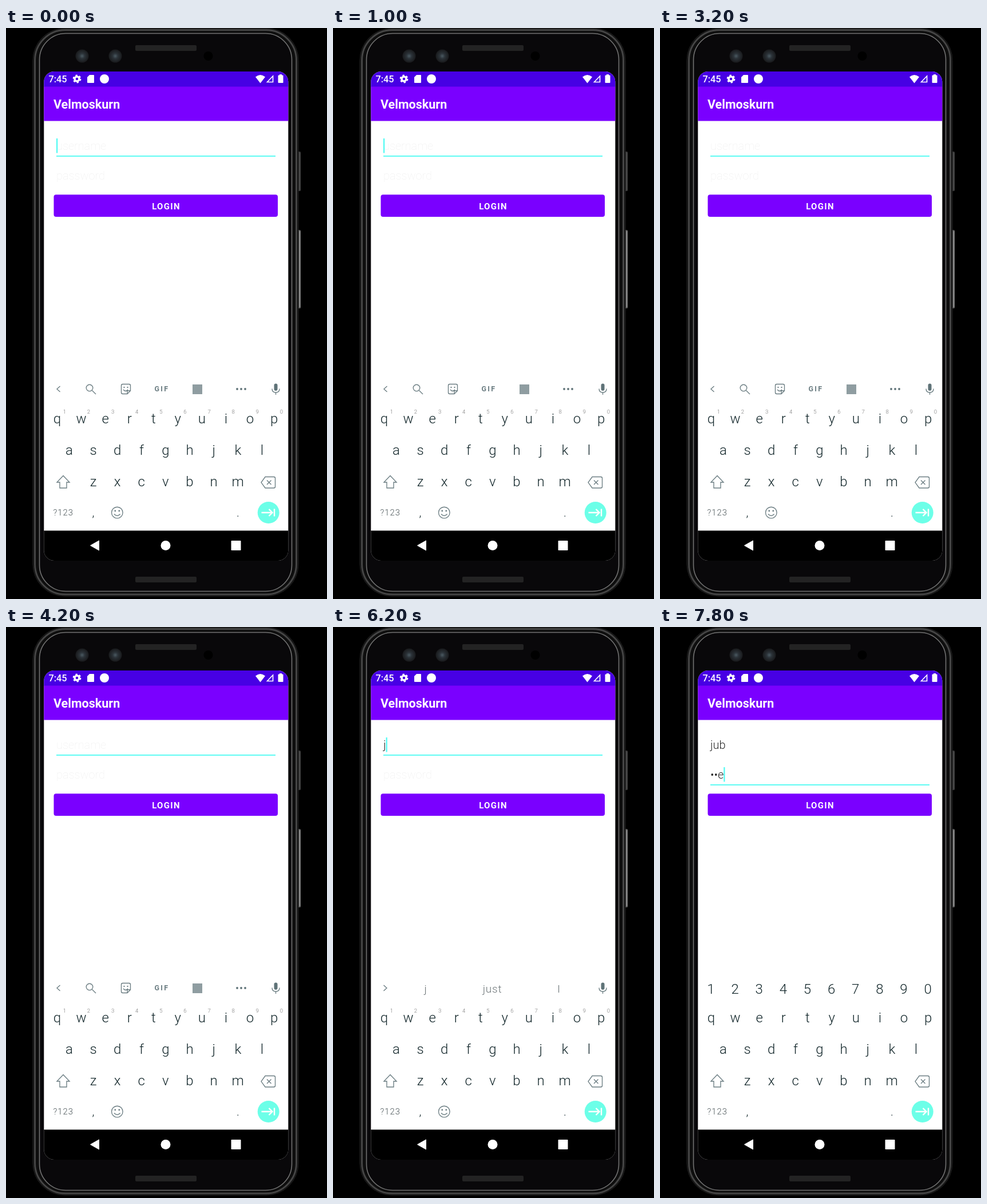
Recreate the animation shown at these times as an HTML page. Size 561 by 998 pixels, loop 8000 ms.

```html
<!DOCTYPE html>
<html lang="en">
<head>
<meta charset="utf-8">
<title>Login screen</title>
<style>
  html, body { margin: 0; width: 100%; height: 100%; overflow: hidden; background: #000; }
  svg { display: block; width: 100%; height: 100%; }
  text { font-family: Roboto, "Noto Sans", sans-serif; }
  .mid { text-anchor: middle; }
  .key { font-size: 24px; font-weight: 300; fill: #14282c; text-anchor: middle; }
  .tip { font-size: 9.5px; font-weight: 300; fill: #777; text-anchor: middle; }
  .word { font-size: 19px; font-weight: 300; fill: #6c7477; text-anchor: middle; letter-spacing: .8px; }
  .field { font-size: 20px; font-weight: 300; fill: #2c2c2c; }
  .hint { font-size: 20px; font-weight: 100; fill: #efefef; }
  .line { fill: none; stroke: #6b7d82; stroke-width: 1.35; }
</style>
</head>
<body>
<svg viewBox="0 0 561 998">
  <defs>
    <radialGradient id="lens">
      <stop offset="0" stop-color="#4b5a62"/>
      <stop offset=".4" stop-color="#2b3238"/>
      <stop offset="1" stop-color="#191a1c"/>
    </radialGradient>
    <clipPath id="glass"><rect x="66.300" y="76" width="427" height="855" rx="18"/></clipPath>
  </defs>

  <rect width="561" height="998"/>

  <!-- phone body -->
  <g id="phone">
    <rect x="510" y="216" width="5" height="69" rx="1.500" fill="#3b3b3b"/>
    <rect x="510" y="353" width="5" height="137" rx="1.500" fill="#5c5c5c"/>
    <path d="M513.500 218v65" stroke="#555" fill="none"/>
    <path d="M513.500 355v133" stroke="#a0a0a0" stroke-width="1.500" fill="none"/>
    <rect x="47" y="0.500" width="464" height="992.500" rx="56" fill="#0e0e0e" stroke="#242424"/>
    <rect x="50.500" y="3.500" width="457" height="986.500" rx="53" fill="none" stroke="#454545" stroke-width="3"/>
    <rect x="58.500" y="9.500" width="441" height="975" rx="46" fill="#09080a" stroke="#727272" stroke-width="1.600"/>
    <rect x="226" y="30" width="107" height="10" rx="2" fill="#232323"/>
    <rect x="226" y="959" width="107" height="10" rx="2" fill="#232323"/>
    <circle cx="133" cy="49" r="11.500" fill="url(#lens)"/>
    <circle cx="191" cy="49" r="11.500" fill="url(#lens)"/>
    <circle cx="353.500" cy="49" r="8"/>
  </g>

  <g clip-path="url(#glass)">
    <rect x="66" y="76" width="428" height="855" fill="#fff"/>
    <rect x="66" y="76" width="428" height="27" fill="#4700e4"/>
    <rect x="66" y="102.500" width="428" height="60" fill="#7a00ff"/>
    <rect x="66" y="878.500" width="428" height="53"/>
  </g>

  <!-- status bar and title -->
  <g fill="#fff">
    <text x="74.500" y="95" font-size="16.300" font-weight="500">7:45</text>
    <circle cx="124" cy="89" r="4" fill="none" stroke="#fff" stroke-width="3.500"/>
    <circle cx="124" cy="89" r="6.200" fill="none" stroke="#fff" stroke-width="2.400" stroke-dasharray="3.200 3.290"/>
    <path d="M146 82h7q1 0 1 1v12q0 1-1 1h-10q-1 0-1-1V86z"/>
    <circle cx="172" cy="89" r="8"/>
    <path d="M436 85.500q8.500-7 17 0L444.500 96.500z"/>
    <path d="M456.500 94.500L466.500 84v10.500z" fill="none" stroke="#fff" stroke-width="1.700"/>
    <path d="M478 82.500v-1.500h4v1.500h1.500q1 0 1 1V95q0 1-1 1h-7q-1 0-1-1V83.500q0-1 1-1z"/>
    <text x="83" y="141" font-size="21.500" font-weight="700">Velmoskurn</text>
  </g>

  <!-- form -->
  <rect x="83.500" y="291.300" width="391.500" height="38.700" rx="4" fill="#7a00ff"/>
  <text class="mid" x="280" y="316.700" font-size="15" font-weight="700" letter-spacing="1.300" fill="#fff">LOGIN</text>
  <text id="nameHint" class="hint" x="88" y="213">username</text>
  <text id="passHint" class="hint" x="88" y="265">password</text>
  <text id="name" class="field" x="88" y="213"></text>
  <text id="pass" class="field" x="88" y="265"></text>
  <rect id="under" x="88" width="383" height="1.800" fill="#4ffbf3"/>
  <rect id="caret" width="2.200" height="25.500" fill="#4ffbf3"/>

  <!-- strip above the keys -->
  <g id="tools">
    <path class="line" d="M94.500 626l-5.500 5 5.500 5M150.500 633.500l6.500 6.500"/>
    <circle class="line" cx="146" cy="629" r="5.800"/>
    <path class="line" d="M204 622.500h11q2.500 0 2.500 2.500v9l-5.500 5.500h-8q-2.500 0-2.500-2.500v-12q0-2.500 2.500-2.500zM217.500 634h-5.500v5.500M205 632q4 5 8 0"/>
    <path d="M205.500 627h2v2h-2zM211.500 627h2v2h-2z" fill="#6b7d82"/>
    <text class="mid" x="272.500" y="635.300" font-size="12.500" font-weight="700" letter-spacing="2.300" fill="#6b7d82">GIF</text>
    <rect x="326" y="623" width="17" height="17" fill="#8f9da1"/>
    <g fill="#5f7378">
      <circle cx="404" cy="631" r="1.900"/><circle cx="411" cy="631" r="1.900"/><circle cx="418" cy="631" r="1.900"/>
    </g>
  </g>
  <g id="words">
    <path class="line" d="M88.500 626l5.500 5-5.500 5"/>
    <text class="word" x="162" y="638.500"></text>
    <text class="word" x="278.500" y="638.500"></text>
    <text class="word" x="395" y="638.500"></text>
  </g>
  <g id="mic">
    <rect x="468.500" y="621.500" width="6" height="12.500" rx="3" fill="#5f7378"/>
    <path class="line" d="M465 630.500q0 6.500 6.500 6.500t6.500-6.500M471.500 637v4"/>
  </g>

  <!-- keyboard -->
  <g id="keys"></g>
  <g id="tips"></g>
  <g id="digits"></g>
  <path class="line" d="M100 782.500l11 11.500h-5v10h-12v-10h-5z"/>
  <path class="line" d="M453 784.500h15q2.500 0 2.500 2.500v14.500q0 2.500-2.500 2.500h-15l-7-9.700zM456 790.500l7.500 7.500M463.500 790.500l-7.500 7.500"/>
  <text x="82.500" y="852" font-size="14.800" font-weight="300" letter-spacing="1" fill="#4a5558">?123</text>
  <text class="key" x="152.500" y="854" style="font-size:20px">,</text>
  <text class="key" x="405.500" y="854" style="font-size:20px">.</text>
  <g id="smile">
    <circle class="line" cx="194.300" cy="847" r="9.800"/>
    <path class="line" d="M189 849.500q5.300 6 10.600 0"/>
    <circle cx="190.800" cy="844" r="1.400" fill="#6b7d82"/><circle cx="197.800" cy="844" r="1.400" fill="#6b7d82"/>
  </g>
  <circle cx="458.700" cy="847" r="19" fill="#6cffe8"/>
  <path d="M446.500 847h18M459.500 841l6 6-6 6M469 840.500v13" fill="none" stroke="#fff" stroke-width="2.400"/>

  <!-- navigation -->
  <g fill="#fff">
    <path d="M147.500 904.500l15-8.500v17z" stroke="#fff" stroke-linejoin="round"/>
    <circle cx="279" cy="904.500" r="8.500"/>
    <rect x="393.500" y="896" width="17" height="17" rx="1"/>
  </g>
</svg>

<script>
const LOOP = 8000, STEP = 200, PITCH = 42.12;
const $ = id => document.getElementById(id);

function row(parent, chars, x, y, cls) {
  [...chars].forEach((ch, i) => {
    const el = document.createElementNS("http://www.w3.org/2000/svg", "text");
    el.setAttribute("class", cls);
    el.setAttribute("x", x + i * PITCH);
    el.setAttribute("y", y);
    el.textContent = ch;
    parent.append(el);
  });
}
row($("keys"), "qwertyuiop", 89.5, 691, "key");
row($("keys"), "asdfghjkl", 110.5, 746, "key");
row($("keys"), "zxcvbnm", 152.5, 800.5, "key");
row($("tips"), "1234567890", 102.3, 673.5, "tip");
row($("digits"), "1234567890", 89, 640.5, "key");

const typed = [
  { at: 0, name: "", pass: "", words: [] },
  { at: 6000, name: "j", pass: "", words: ["j", "just", "I"] },
  { at: 6400, name: "ju", pass: "", words: ["ju", "just", "jump"] },
  { at: 6600, name: "jub", pass: "", words: ["jub", "Jub", "Jubo"] },
  { at: 7000, inPass: true, name: "jub", pass: "", words: ["jub", "Jub", "Jubo"] },
  { at: 7200, inPass: true, numbers: true, name: "jub", pass: "", words: [] },
  { at: 7400, inPass: true, numbers: true, name: "jub", pass: "j", words: [] },
  { at: 7600, inPass: true, numbers: true, name: "jub", pass: "•o", words: [] },
  { at: 7800, inPass: true, numbers: true, name: "jub", pass: "••e", words: [] }
];
const labels = $("words").querySelectorAll("text");

function show(id, on) {
  $(id).style.display = on ? "" : "none";
}

// The caret blinks while idle and stays lit while typing.
function caretOn(t) {
  return t >= 6000 || (t - 575 + 1010) % 1010 < 500;
}

function draw(time) {
  const t = Math.floor(time % LOOP / STEP) * STEP;
  const s = typed.filter(k => k.at <= t).pop();
  $("name").textContent = s.name;
  $("pass").textContent = s.pass;
  show("nameHint", !s.name);
  show("passHint", !s.pass);
  show("tools", !s.words.length && !s.numbers);
  show("words", s.words.length);
  labels.forEach((el, i) => el.textContent = s.words[i] || "");
  show("mic", !s.numbers);
  show("tips", !s.numbers);
  show("smile", !s.numbers);
  show("digits", s.numbers);

  const shift = s.inPass ? 52 : 0;
  const value = s.inPass ? s.pass : s.name;
  const width = value ? $(s.inPass ? "pass" : "name").getComputedTextLength() : 0;
  $("under").setAttribute("y", 223 + shift);
  $("caret").setAttribute("x", 88 + width);
  $("caret").setAttribute("y", 193 + shift);
  show("caret", caretOn(t));
}

let start;
function tick(now) {
  start ??= now;
  draw(now - start);
  requestAnimationFrame(tick);
}
draw(0);
requestAnimationFrame(tick);
</script>
</body>
</html>
```
